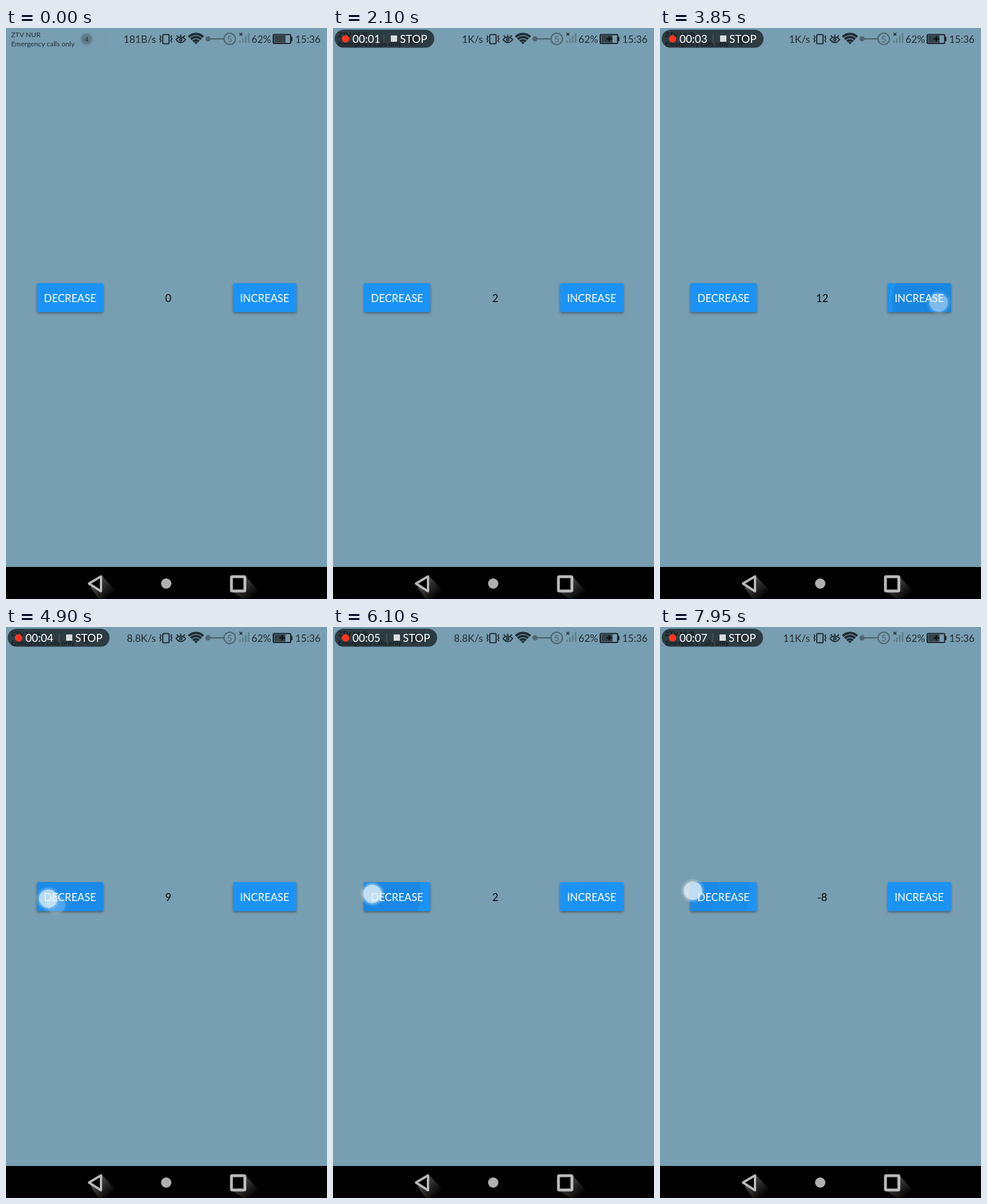
An HTML page that plays this animation: 561x998 px, repeating every 8000 ms.

```html
<!DOCTYPE html>
<html lang="en">
<head>
<meta charset="utf-8">
<title>Counter</title>
<style>
  html, body { margin: 0; width: 100%; height: 100%; overflow: hidden; background: #789eb1; }
  svg { display: block; width: 100%; height: 100%; }
  text { font-family: Lato, "Open Sans", sans-serif; }
  .status { font-size: 17.5px; fill: #202c33; }
  .carrier { font-size: 12.2px; fill: #22323b; }
  .white { font-size: 19px; fill: #fff; }
  .label { font-size: 18.3px; fill: #fff; text-anchor: middle; }
  .button { fill: #1b93f6; filter: drop-shadow(0 2px 2.2px rgba(0, 0, 0, .4)); }
</style>
</head>
<body>
<svg viewBox="0 0 561 998">
  <defs>
    <clipPath id="clipDec"><rect x="54" y="446" width="116" height="50.500" rx="3"/></clipPath>
    <clipPath id="clipInc"><rect x="397" y="446" width="110.500" height="50.500" rx="3"/></clipPath>
    <linearGradient id="fade" x1="0" y1="0" x2="1" y2="1">
      <stop offset=".3" stop-color="#444"/>
      <stop offset=".85" stop-color="#000"/>
    </linearGradient>
    <radialGradient id="glow">
      <stop offset=".66" stop-color="#fff" stop-opacity=".36"/>
      <stop offset="1" stop-color="#fff" stop-opacity="0"/>
    </radialGradient>
    <filter id="soft"><feGaussianBlur stdDeviation="1.5"/></filter>
    <g id="finger">
      <circle r="22" fill="url(#glow)"/>
      <circle r="16" fill="#e6f0f7" fill-opacity=".62"/>
    </g>
  </defs>

  <rect width="561" height="998" fill="#789eb1"/>

  <!-- status bar -->
  <text class="carrier" x="9" y="15.500">ZTV NUR</text>
  <text class="carrier" x="9" y="32">Emergency calls only</text>
  <circle cx="141" cy="19.500" r="10" fill="#5c7b8a" filter="url(#soft)"/>
  <text class="carrier" x="141" y="24" text-anchor="middle">4</text>
  <text class="status" id="speed" x="262" y="26" text-anchor="end"></text>
  <g fill="none" stroke="#202c33" stroke-width="2">
    <rect x="274" y="11.500" width="11" height="16" rx="1.500"/>
    <path d="M269 13l2 3-2 3 2 3-2 3M290 13l-2 3 2 3-2 3 2 3" stroke-width="1.800"/>
    <path d="M297 20q8-8 17 0q-8 11-17 0M305.500 11.500v4M298.500 13l2.500 3M312.500 13l-2.500 3"/>
    <circle cx="305.500" cy="20.500" r="2"/>
    <path d="M408 8.500l5 5m0-5l-5 5" stroke-width="1.600"/>
    <path id="wifi" stroke-width="4.300"/>
  </g>
  <g fill="none" stroke="#4f6670" stroke-width="2.500">
    <circle cx="353" cy="19" r="3.300" fill="#4f6670"/>
    <path d="M356 19h24"/>
    <circle cx="391" cy="19" r="10" stroke-width="2.200"/>
  </g>
  <text x="391" y="25" font-size="16" fill="#4f6670" text-anchor="middle">5</text>
  <path d="M409 26v-4M414 26v-8M419 26v-12M424 26v-17" stroke="#5c7d8c" stroke-width="2.600"/>
  <text class="status" x="429" y="25.500">62%</text>
  <rect x="467" y="11.500" width="30.500" height="15.500" rx="1.500" fill="none" stroke="#182126" stroke-width="2"/>
  <rect x="498" y="15.500" width="2.500" height="7.500" fill="#182126"/>
  <rect x="468.500" y="13" width="20" height="12.500" fill="#34434a"/>
  <path id="plus" d="M478 19h10M483 14.500v9" stroke="#0b1013" stroke-width="2.500"/>
  <text class="status" x="505.500" y="26" style="font-size:17.200px">15:36</text>

  <!-- recorder pill -->
  <g id="pill">
    <rect id="pillBody" x="3" y="3" height="31.500" rx="15.750" fill="#000" fill-opacity=".62"/>
    <circle id="rec" cx="22" cy="19" r="6.500" fill="#fb3520"/>
    <text class="white" id="clock" x="34" y="26"></text>
    <g id="stop">
      <path d="M89 11v16" stroke="#56656d"/>
      <rect x="101" y="13" width="11" height="11" rx="1" fill="#d9dcde"/>
      <text class="white" x="117" y="26">STOP</text>
    </g>
  </g>

  <!-- counter row -->
  <g id="dec">
    <rect class="button" x="54" y="446" width="116" height="50.500" rx="3"/>
    <g id="ripDec" clip-path="url(#clipDec)"></g>
    <text class="label" x="112" y="479">DECREASE</text>
  </g>
  <g id="inc">
    <rect class="button" x="397" y="446" width="110.500" height="50.500" rx="3"/>
    <g id="ripInc" clip-path="url(#clipInc)"></g>
    <text class="label" x="452" y="479">INCREASE</text>
  </g>
  <text id="count" x="283.500" y="479" font-size="18.500" text-anchor="middle" fill="#0a0f12"></text>
  <g id="fingers"></g>

  <!-- navigation bar -->
  <rect y="942" width="561" height="56" fill="#000"/>
  <path d="M167 957l23 24v17h-28l-14-20z" fill="url(#fade)"/>
  <path d="M418 958l24 26v14h-28l-20-14z" fill="url(#fade)"/>
  <g fill="#000" stroke="#bababa" stroke-width="4" stroke-linejoin="round">
    <path d="M145 971l21-12.500v26z"/>
    <rect x="394" y="959" width="23.500" height="25" rx="1.500" stroke-width="5"/>
  </g>
  <circle cx="280" cy="971" r="9" fill="#b0b0b0"/>
</svg>

<script>
const LOOP = 8000, HOLD = 130, FADE = 165;
const $ = id => document.getElementById(id);
const clamp = v => Math.max(0, Math.min(1, v));
const mix = (a, b, k) => a + (b - a) * k;
// Smooth drop from 1 to 0 around mid
const fall = (v, mid, width) => 1 / (1 + Math.exp((v - mid) / width));

// Each tap: release time, counter step, finger position
const taps = [
  { up: 1150, step: 1, x: 478, y: 494 },
  { up: 1700, step: 1, x: 480, y: 495 }
];
for (let i = 0; i < 10; i++) {
  const k = i / 9;
  taps.push({ up: 2242 + i * 172, step: 1, x: mix(478, 487, k), y: mix(495, 480, k) });
}
for (let i = 0; i < 21; i++) {
  const settle = fall(i, 2.5, 0.3);
  taps.push({
    up: 4434 + i * 178, step: -1,
    x: 57.5 + 13 * fall(i, 12, 1.2) + 20 * settle,
    y: mix(470, 461, clamp((i - 4) / 14)) + 12 * settle + 18 * Math.exp(-i / 1.6)
  });
}

const speeds = [[0, "181B/s"], [1500, "1K/s"], [4400, "8.8K/s"], [7400, "11K/s"]];
const pillShift = [4, 0, 4, 4, 4, 5, 5, 3];

function make(tag, attrs, parent) {
  const el = document.createElementNS("http://www.w3.org/2000/svg", tag);
  for (const name in attrs) el.setAttribute(name, attrs[name]);
  return parent.appendChild(el);
}

for (const tap of taps) {
  const { x, y } = tap;
  tap.ripple = make("circle", { cx: x, cy: y }, tap.step > 0 ? $("ripInc") : $("ripDec"));
  tap.finger = make("use", { href: "#finger", x, y }, $("fingers"));
}

$("wifi").setAttribute("d", [2, 7, 12.3, 17.6].map(r => {
  const s = r * 0.72;
  return `M${332 - s} ${28.5 - s}A${r} ${r} 0 0 1 ${332 + s} ${28.5 - s}`;
}).join(""));

function drawTaps(t) {
  let count = 0;
  for (const tap of taps) {
    const after = t - tap.up, age = after + HOLD;
    if (after >= 0) count += tap.step;
    tap.ripple.setAttribute("r", mix(14, 100, clamp(age / 240)));
    tap.ripple.setAttribute("opacity", 0.1 * clamp((age - 70) / 80) * clamp(1 - after / 250));
    const shown = age >= 0 ? clamp(0.5 + age / 50) : 0;
    tap.finger.setAttribute("opacity", shown * clamp(1 - after / FADE));
  }
  return count;
}

function drawPill(t) {
  const sec = Math.max(0, Math.floor((t - 300) / 1000));
  const shift = pillShift[sec];
  const blink = (t + 500) % 1000;
  $("pill").setAttribute("opacity", clamp(t / 200));
  $("pillBody").setAttribute("width", 174 + shift);
  $("clock").textContent = "00:0" + sec;
  $("stop").setAttribute("transform", `translate(${shift})`);
  $("rec").setAttribute("opacity", t > 450 && blink < 350 ? 0 : 1);
}

function draw(t) {
  const count = String(drawTaps(t));
  const nudge = count.length > 1 ? 1 : 0;
  $("count").textContent = count;
  $("dec").setAttribute("transform", `translate(${-nudge})`);
  $("inc").setAttribute("transform", `translate(${nudge})`);
  $("speed").textContent = speeds.filter(s => s[0] <= t).pop()[1];
  $("plus").setAttribute("opacity", t < 850 ? 0 : 1);
  drawPill(t);
}

const start = performance.now();
function tick() {
  draw((performance.now() - start) % LOOP);
  requestAnimationFrame(tick);
}
tick();
</script>
</body>
</html>
```
